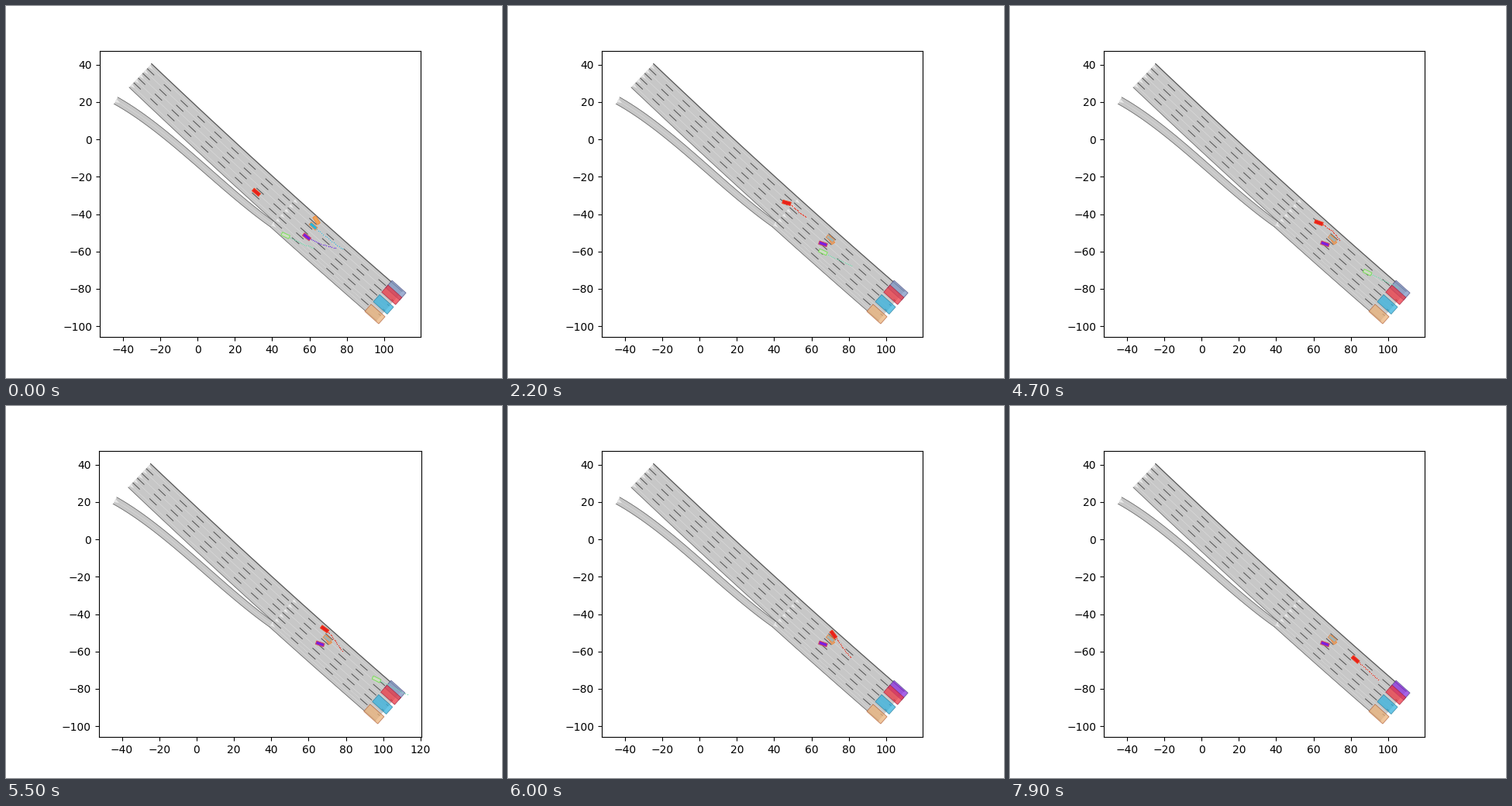
Recreate the animation shown at these times as a matplotlib script. Size 640 by 480 pixels, loop 8000 ms.

```python
import numpy as np
import matplotlib.pyplot as plt
from matplotlib.animation import FuncAnimation
from matplotlib.patches import Polygon

FRAMES, STEP_MS = 80, 100
LANE, LANES = 3.48, 6
START, SPLIT, END = -24.6, 53.0, 109.6     # stations along the top edge
X_MIN, X_MAX, Y_MIN, Y_MAX = -44.57, 111.74, -98.90, 40.58
CRASH, ARRIVE, HORIZON = 9, 60, 17
ROAD, BOUND, CENTER = "#c7c7c7", "#555555", "#dddddd"
SLATE, VIOLET = "#7f96c4", "#8a2ee0"

fig, ax = plt.subplots(figsize=(6.4, 4.8), dpi=100)
ax.set_aspect("equal")
pad = 0.05 * (Y_MAX - Y_MIN)
ax.set_ylim(Y_MIN - pad, Y_MAX + pad)


def set_width(right):
    margin = 0.05 * (right - X_MIN)
    ax.set_xlim(X_MIN - margin, right + margin)


# ---- road ----
edge = np.polyfit([START, 62.0, 103.6], [40.5, -39.4, -76.1], 2)


def spot(station, lane):
    """Point a number of lanes below the top edge at a station."""
    slope = np.polyval(np.polyder(edge), station)
    off = lane * LANE / np.hypot(1, slope)
    return np.stack([station + slope * off, np.polyval(edge, station) - off], -1)


def bound(lane, a=START, b=END):
    return spot(np.linspace(a, b, 60), lane)


def line(pts, color=BOUND, lw=0.5, z=3, **kw):
    ax.plot(*pts.T, color=color, lw=lw, zorder=z, **kw)


def area(a, b):
    ax.add_patch(Polygon(np.vstack([a, b[::-1]]), fc=ROAD, ec="none", zorder=1))


def arrow(left, right):
    """Direction triangle at the start of a lane."""
    mid, across = (left[0] + right[0]) / 2, (right[0] - left[0]) * 0.22
    ahead = left[1] - left[0]
    tip = mid + ahead / np.hypot(*ahead) * 2.6
    ax.add_patch(Polygon([mid - across, mid + across, tip],
                         fc="#e8e8e8", ec="none", zorder=4))


# on-ramp: lower edge as a cubic, upper edge one tapering lane away
join = spot(SPLIT, LANES)
shape = np.polyfit([-44.7, -30.0, -15.5, join[0]], [19.0, 9.6, -1.6, join[1]], 3)
rx = np.linspace(-44.7, join[0], 60)
slope = np.polyval(np.polyder(shape), rx)
width = np.linspace(4.1, LANE, rx.size) / np.hypot(1, slope)
ramp_low = np.column_stack([rx, np.polyval(shape, rx)])
ramp_top = ramp_low + np.column_stack([-slope * width, width])

area(bound(0), bound(5))
area(ramp_top, ramp_low)
area(bound(5, SPLIT), bound(6, SPLIT))
line(ramp_top)
line(ramp_low)
line((ramp_top + ramp_low) / 2, CENTER, 0.4, 2)
arrow(ramp_top, ramp_low)
line(bound(0), lw=0.9)
line(bound(5, START, SPLIT))
line(bound(6, SPLIT))

for a, b, count in ((START, SPLIT, LANES - 1), (SPLIT, END, LANES)):
    for k in range(count):
        if k:
            line(bound(k, a, b), "#484848", 0.65, dashes=(14, 19),
                 dash_capstyle="butt")
        line(bound(k + 0.5, a, b), CENTER, 0.4, 2)
        arrow(bound(k, a, b), bound(k + 1, a, b))


def box(center, deg, length=4.5, width=1.8):
    c, s = np.cos(np.radians(deg)), np.sin(np.radians(deg))
    corners = np.array([[-1, -1], [1, -1], [1, 1], [-1, 1]]) / 2 * [length, width]
    return corners @ np.array([[c, s], [-s, c]]) + center


# ---- goal areas ----
def goal(offset, face, rim):
    center = np.array([107.9, -78.9]) - offset * np.array([0.66, 0.75])
    patch = Polygon(box(center, -41.8, 10, 5.1), fc=face, ec=rim, lw=0.6,
                    alpha=0.75, zorder=5)
    return ax.add_patch(patch)


first_goal = goal(2.5, SLATE, "#4a4a80")
goal(5.8, "#ec3844", "#a02040")
goal(12.6, "#36b2de", "#2a7f9c")
goal(19.5, "#eab27a", "#b0603a")


# ---- vehicles: each route gives (station, lane) at a time ----
def ease(t, a, b):
    u = np.clip((t - a) / (b - a), 0, 1)
    return u * u * (3 - 2 * u)


def red_route(t):
    lane = 3.5 - 1.95 * ease(t, 0, 28) - 0.99 * ease(t, 34, 57) + 0.89 * ease(t, 57, 77)
    return 39.7 + 0.475 * t + 0.00137 * t ** 2, lane


def green_route(t):
    return 59.75 + 0.657 * t + 0.001 * t ** 2, 5.42 - 0.0785 * t


def purple_route(t):
    return 66.4 + 0.68 * t, 3.4 - 0.65 * (t / CRASH) ** 1.5


def orange_route(t):
    return 64.9 + t, 0.5 + 0.98 * t / CRASH


def cyan_route(t):
    return 65.5 + 0.87 * t, 1.5 - 0.1 * (t / CRASH) ** 2


class Car:
    def __init__(self, route, face, rim, dots, z, stop=FRAMES, swing=1):
        self.route, self.stop, self.swing = route, stop, swing
        self.body = ax.add_patch(Polygon(box([0, 0], 0), fc=face, ec=rim,
                                         lw=0.7, zorder=z))
        self.dots, = ax.plot([], [], "o", color=dots, ms=0.95, mew=0, zorder=z - 1)

    def update(self, t, show=True, planning=True):
        """Place the car and its planned path; return the path's far end."""
        now = min(t, self.stop)
        path = spot(*self.route(now + np.arange(HORIZON + 1)))
        station, _ = self.route(now)
        step = spot(*self.route(now + 0.5)) - path[0]
        road = np.degrees(np.arctan(np.polyval(np.polyder(edge), station)))
        turn = np.degrees(np.arctan2(step[1], step[0])) - road
        self.body.set_xy(box(path[0], road + self.swing * turn))
        self.body.set_visible(show)
        self.dots.set_data(*path[2:].T)
        self.dots.set_visible(show and planning and t < self.stop)
        return path[-1]


red = Car(red_route, "#e8201c", "#f0401c", "#f02814", 14, swing=1.45)
green = Car(green_route, "#cfdcc4", "#7be05a", "#6fe0b0", 12)
purple = Car(purple_route, "#7a1ee0", "#d8485a", "#6a28e8", 11, CRASH)
cyan = Car(cyan_route, "#28b4dc", "#e89050", "#3cc0e0", 10, CRASH)
orange = Car(orange_route, "#efa55c", "#f08a3c", "#f0a050", 9, CRASH)


def draw(t):
    arrived, crashed = t >= ARRIVE, t >= CRASH
    red.update(t, planning=t > 1)
    reach = green.update(t, show=not arrived)[0]
    set_width(X_MAX if arrived else max(X_MAX, reach))
    purple.update(t)
    cyan.update(t)
    orange.update(t, planning=False)
    cyan.body.set_facecolor("#a0b4b4" if crashed else "#28b4dc")
    orange.body.set_facecolor("#d4ac88" if crashed else "#efa55c")
    first_goal.set_facecolor(VIOLET if arrived else SLATE)
    return []


anim = FuncAnimation(fig, draw, frames=FRAMES, init_func=lambda: draw(0),
                     interval=STEP_MS, repeat=True, repeat_delay=0, blit=False)
plt.show()
```
